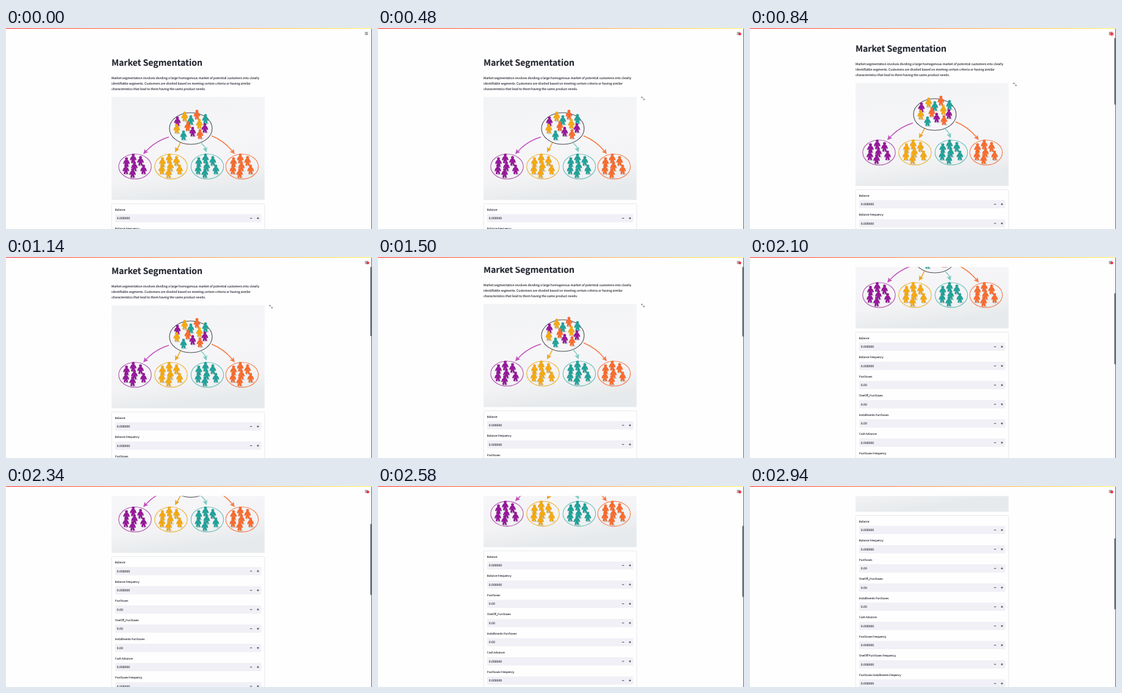
An HTML page for the animation above (3 s loop, 600 px wide and 330 px high).

```html
<!DOCTYPE html>
<html lang="en">
<head>
<meta charset="utf-8">
<title>Market Segmentation</title>
<style>
  html, body { margin: 0; width: 100%; height: 100%; overflow: hidden; background: #fefefe; }
  svg { display: block; width: 600px; height: 330px; }
  text {
    font: 5.13px "Noto Sans CJK JP", "Noto Sans CJK SC", "Noto Sans", sans-serif;
    fill: #262832; stroke: #262832; stroke-width: .12px; text-rendering: geometricPrecision;
  }
  text.title { font-size: 14.18px; font-weight: 700; letter-spacing: -0.07px; }
  text.label { font-size: 4.5px; }
</style>
</head>
<body>
<svg viewBox="0 0 600 330">
  <defs>
    <linearGradient id="bar"><stop stop-color="#ff4040"/><stop offset="1" stop-color="#fff36a"/></linearGradient>
    <linearGradient id="paper" x2=".2" y2="1">
      <stop stop-color="#f2f3f5"/><stop offset=".5" stop-color="#f6f6f8"/>
      <stop offset=".8" stop-color="#f3f3f5"/><stop offset="1" stop-color="#e7eaec"/>
    </linearGradient>
    <clipPath id="frame"><rect x="173" y="113.3" width="251" height="169"/></clipPath>
    <g id="pawn">
      <ellipse cx="1.5" cy="8" rx="4.5" ry="1.3" fill="#566" opacity=".2"/>
      <path d="M-1.5-3.8C-3.8-3-4.6 0-5.4 2.4L-3.8 3.4-2.2 1-3.6 7.4-.9 8 0 4.6.9 8 3.6 7.4 2.2 1 3.8 3.4 5.4 2.4C4.6 0 3.8-3 1.5-3.8Z"
        stroke="#000" stroke-opacity=".16" stroke-width=".4"/>
      <circle cy="-5.4" r="2.4" stroke="#000" stroke-opacity=".12" stroke-width=".4"/>
    </g>
  </defs>
  <g id="page"></g>
  <rect id="thumb" x="597" width="2" height="117" rx="1" fill="#7c7d84"/>
  <rect width="600" height="16.4" fill="#fefefe"/>
  <rect x="599" width="1" height="330" fill="#666"/>
  <rect width="600" height="1.2" fill="url(#bar)"/>
  <path d="M588.4 7.2h5M588.4 9h5M588.4 10.8h5" stroke="#4a4c56" stroke-width=".8"/>
  <g id="record">
    <circle id="halo" cx="593" cy="9.8" fill="#ff4b4b"/>
    <circle cx="593.2" cy="9.8" r="2.2" fill="#f0303c"/>
  </g>
</svg>
<script>
const $ = id => document.getElementById(id);
const purple = '#96189a', yellow = '#f6a911', teal = '#20a39a', orange = '#fb6b2c';

const text = (x, y, s, cls = '') => `<text x="${x}" y="${y}" class="${cls}">${s}</text>`;
const pawns = list => list.sort((a, b) => a[1] - b[1])
  .map(([x, y, c]) => `<use href="#pawn" x="${x}" y="${y}" fill="${c}"/>`).join('');
const ring = (x, y, rx, ry, c) =>
  `<ellipse cx="${x}" cy="${y}" rx="${rx}" ry="${ry}" fill="none" stroke="${c}" stroke-width="1.1"/>`;

function arrow(curve, x, y, angle, c) {
  return `<path d="${curve}" fill="none" stroke="${c}" stroke-width="1.6"/>
    <path d="M0 0L-8-4-6.5 0-8 4Z" transform="translate(${x} ${y}) rotate(${angle})" fill="${c}"/>`;
}

function group(x, c, line) {
  const spots = [[-3, -13], [-14, -7], [9, -9], [-15, 5], [-1, 0], [14, 5], [-4, 11]];
  return ring(x, 227.5, 26.7, 20.5, line) + pawns(spots.map(([dx, dy]) => [x + dx, 227 + dy, c]));
}

function photo() {
  const mixed = [
    [281, 153, purple], [293, 145, yellow], [313, 142, orange], [303, 151, teal],
    [327, 149, teal], [280, 165, yellow], [298, 161, orange], [317, 157, yellow],
    [291, 176, teal], [306, 170, purple], [318, 174, orange], [326, 164, purple]];
  return `<g clip-path="url(#frame)"><rect x="173" y="113" width="251" height="170" fill="url(#paper)"/>` +
    ring(303, 165, 35, 26, '#4b4a52') +
    arrow('M267 179Q244 186 229 203', 225, 207, 132, '#c253bd') +
    arrow('M286 188Q283 195 280 199', 277, 204, 120, '#eda526') +
    arrow('M319 188Q326 194 327 198', 329, 204, 68, '#7fcac2') +
    arrow('M337 177Q357 185 371 202', 375, 207, 51, '#f77a45') +
    pawns(mixed) + group(211.5, purple, '#b04fb0') + group(270.5, yellow, '#eeb02f') +
    group(330, teal, '#66beb6') + group(387, orange, '#f57a48') + '</g>';
}

function field(label, i) {
  const y = 312.3 + 31.5 * i;
  const value = i > 1 && i < 5 ? '0.00' : '0.000000';
  return text(178.8, y - 12.6, label, 'label') +
    `<rect x="178.8" y="${y - 6.7}" width="239.7" height="13.4" rx="1.4" fill="#f0f0f6"/>` +
    text(181.8, y + 2, value) +
    `<path d="M400 ${y}h3.4M411.3 ${y}h3.4M413 ${y - 1.7}v3.4" stroke="#31333f" stroke-width=".9"/>`;
}

const intro = [
  'Market segmentation involves dividing a large homogenous market of potential customers into clearly',
  'identifiable segments. Customers are divided based on meeting certain criteria or having similar',
  'characteristics that lead to them having the same product needs.'];
const labels = ['Balance', 'Balance Frequency', 'Purchases', 'OneOff_Purchases', 'Installments Purchases',
  'Cash Advance', 'Purchases Frequency', 'OneOff Purchases Frequency', 'Purchases Installments Freqency'];

$('page').innerHTML =
  text(173, 62.3, 'Market Segmentation', 'title') +
  intro.map((s, i) => text(173, 83.6 + 9.13 * i, s)).join('') +
  photo() +
  `<path id="expand" d="M434 115.3l-2-2m0 1.6v-1.6h1.6M434.6 115.9l2 2m0-1.6v1.6h-1.6"
    fill="none" stroke="#55575f" stroke-width=".8"/>` +
  '<rect x="173.2" y="288.4" width="250.8" height="420" rx="1.4" fill="none" stroke="#e3e4e8" stroke-width=".8"/>' +
  labels.map(field).join('');

// Scroll positions as [ms, px], joined by a monotone cubic
const keys = [[0, 0], [540, 0], [840, 23], [1140, 34], [1500, 36], [1620, 42], [1740, 74],
  [1920, 130], [2100, 165], [2340, 172.5], [2520, 177], [2700, 199], [2940, 240], [3000, 244]];
const slope = i => (keys[i + 1][1] - keys[i][1]) / (keys[i + 1][0] - keys[i][0]);
function tangent(i) {
  if (i === 0 || i === keys.length - 1) return 0;
  const a = slope(i - 1), b = slope(i);
  return a * b > 0 ? 2 * a * b / (a + b) : 0;
}
function scrollAt(t) {
  const i = keys.findIndex((k, n) => t < keys[n + 1][0]);
  const [t0, y0] = keys[i], [t1, y1] = keys[i + 1];
  const d = t1 - t0, u = (t - t0) / d, v = 1 - u;
  return y0 * v * v * (1 + 2 * u) + y1 * u * u * (3 - 2 * u) +
    d * u * v * (tangent(i) * v - tangent(i + 1) * u);
}

const show = (id, opacity) => $(id).setAttribute('opacity', +opacity);

function draw(now) {
  const t = Math.floor(now % 3000 / 60) * 60;
  const y = scrollAt(t);
  $('page').setAttribute('transform', `translate(0 ${-y})`);
  $('thumb').setAttribute('y', 1 + 0.353 * y);
  show('thumb', t >= 540);
  show('expand', t >= 300);
  show('record', t >= 120);
  const pulse = Math.max(0, -Math.sin(t / 1000 * 2 * Math.PI));
  $('halo').setAttribute('r', 2.2 + 2.4 * pulse);
  show('halo', 0.35 * pulse);
}

const start = performance.now();
function tick() {
  draw(performance.now() - start);
  requestAnimationFrame(tick);
}
tick();
</script>
</body>
</html>
```
